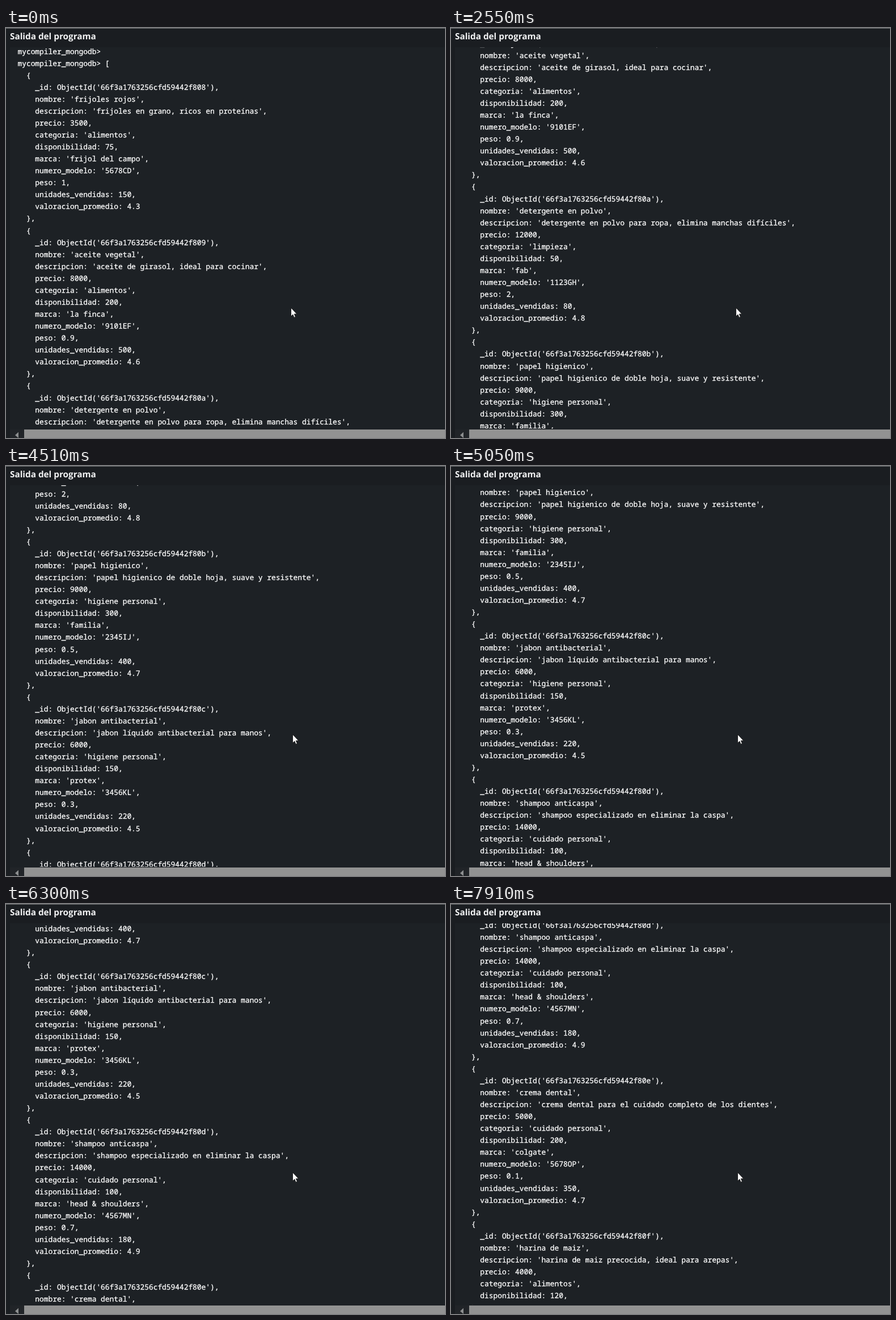
Recreate the animation shown at these times as an HTML page with a canvas. Size 774 by 723 pixels, loop 8 s.

```html
<!DOCTYPE html>
<html lang="es">
<head>
<meta charset="utf-8">
<title>Salida del programa</title>
<style>
html, body { margin: 0; width: 100%; height: 100%; overflow: hidden; background: #1a1d21; }
canvas { display: block; }
</style>
</head>
<body>
<canvas id="stage" width="774" height="723"></canvas>
<script>
const ctx = document.getElementById('stage').getContext('2d');
const LOOP = 8000, LINE = 21.07, FIRST_BASELINE = 45.5;
const FIRST_TICK = 567, TICK = 130.5; // the screen refreshes in even steps

const fields = ['nombre', 'descripcion', 'precio', 'categoria', 'disponibilidad', 'marca',
  'numero_modelo', 'peso', 'unidades_vendidas', 'valoracion_promedio'];
const products = `
frijoles rojos|frijoles en grano, ricos en proteínas|3500|alimentos|75|frijol del campo|5678CD|1|150|4.3
aceite vegetal|aceite de girasol, ideal para cocinar|8000|alimentos|200|la finca|9101EF|0.9|500|4.6
detergente en polvo|detergente en polvo para ropa, elimina manchas difíciles|12000|limpieza|50|fab|1123GH|2|80|4.8
papel higienico|papel higienico de doble hoja, suave y resistente|9000|higiene personal|300|familia|2345IJ|0.5|400|4.7
jabon antibacterial|jabon líquido antibacterial para manos|6000|higiene personal|150|protex|3456KL|0.3|220|4.5
shampoo anticaspa|shampoo especializado en eliminar la caspa|14000|cuidado personal|100|head & shoulders|4567MN|0.7|180|4.9
crema dental|crema dental para el cuidado completo de los dientes|5000|cuidado personal|200|colgate|5678OP|0.1|350|4.7
harina de maiz|harina de maiz precocida, ideal para arepas|4000|alimentos|120`.trim().split('\n');

const quote = v => isNaN(v) ? `'${v}'` : v;
const lines = ['mycompiler_mongodb>', 'mycompiler_mongodb> ['];
products.forEach((row, i) => {
  lines.push('  {', `    _id: ObjectId('66f3a1763256cfd59442f80${(8 + i).toString(16)}'),`);
  row.split('|').forEach((v, k) =>
    lines.push(`    ${fields[k]}: ${quote(v)}${k < fields.length - 1 ? ',' : ''}`));
  lines.push('  },');
});

// Key points of the four scroll bursts: tick, offset
const path = [[-1, 0], [5, 55], [8, 225], [12, 225], [15, 351], [22, 630], [26, 630],
  [30, 771.5], [38, 1028.8], [43, 1072], [48, 1072], [51, 1182.8], [56, 1436.3]];

function scrollAt(tick) {
  const i = path.findIndex(p => p[0] >= tick);
  if (i < 1) return 0;
  const [t0, s0] = path[i - 1], [t1, s1] = path[i];
  return s0 + (s1 - s0) * (tick - t0) / (t1 - t0);
}

function rect(color, x, y, w, h) {
  ctx.fillStyle = color;
  ctx.fillRect(x, y, w, h);
}

function polygon(color, points) {
  ctx.beginPath();
  points.forEach(([x, y]) => ctx.lineTo(x, y));
  ctx.closePath();
  ctx.fillStyle = color;
  ctx.fill();
}

function drawCursor(x, y) {
  ctx.save();
  ctx.translate(x, y);
  polygon('#fff', [[0.5, 0.5], [0.5, 15.5], [3.8, 12.3], [6, 17.4], [8.4, 16.4], [6.2, 11.4], [10.6, 11.2]]);
  ctx.strokeStyle = '#111';
  ctx.lineWidth = 0.8;
  ctx.stroke();
  ctx.restore();
}

function drawOutput(scroll) {
  ctx.save();
  ctx.beginPath();
  ctx.rect(7, 34, 767, 672.5);
  ctx.clip();
  ctx.fillStyle = ctx.strokeStyle = '#fff';
  ctx.lineWidth = 0.3;
  ctx.font = '12.87px "Noto Sans Mono", monospace';
  lines.forEach((line, i) => {
    const y = Math.round(FIRST_BASELINE + i * LINE - scroll);
    if (y < 20 || y > 725) return;
    ctx.fillText(line, 20.5, y);
    ctx.strokeText(line, 20.5, y);
  });
  ctx.restore();
}

function draw(t) {
  const tick = Math.max(-1, Math.floor((t - FIRST_TICK) / TICK));

  rect('#1a1d21', 0, 0, 774, 723);
  rect('#1d2125', 7, 34, 767, 674);
  rect('#6f7274', 0, 0, 774, 1);
  ctx.textRendering = 'geometricPrecision';
  ctx.fillStyle = '#f1f2f3';
  ctx.font = 'bold 15.3px "Open Sans", sans-serif';
  ctx.fillText('Salida del programa', 7, 19.5);

  drawOutput(scrollAt(tick));

  rect('#212428', 7, 708, 767, 15);
  rect('#929292', 32, 708, 742, 15);
  polygon('#8d8f90', [[16, 718], [22, 712.5], [22, 723]]);

  if (tick < 27) drawCursor(502, 493);
  else drawCursor(505, 473);
}

function animate() {
  draw(performance.now() % LOOP);
  requestAnimationFrame(animate);
}
animate();
</script>
</body>
</html>
```
